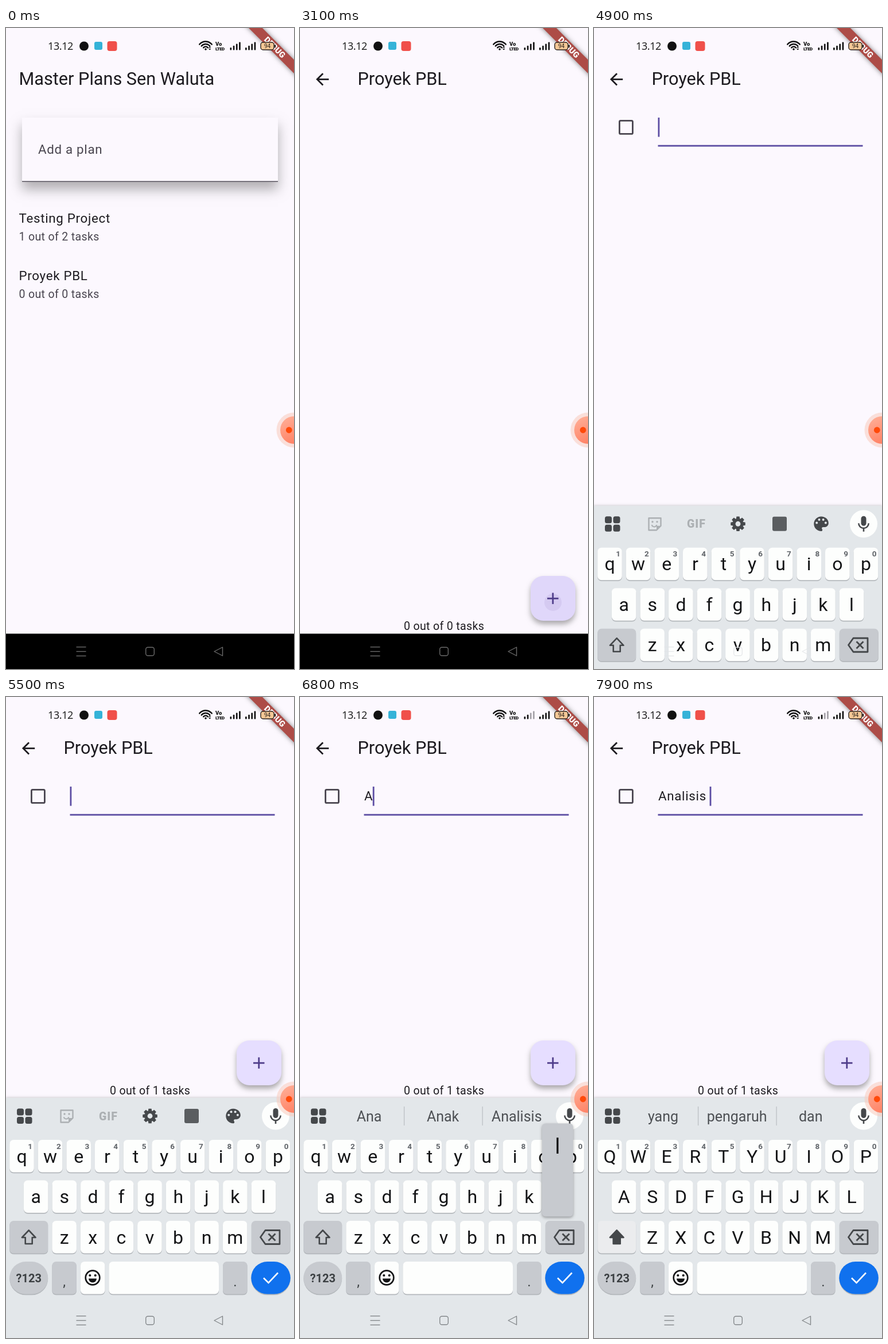
Recreate the animation shown at these times as an HTML page with a canvas. Size 502 px wide and 1116 px high, loop 8 s.

```html
<!DOCTYPE html>
<html lang="id">
<head>
<meta charset="utf-8">
<title>Master Plans</title>
<style>
html, body { margin: 0; width: 100%; height: 100%; overflow: hidden; background: #fcf8fe; }
canvas { display: block; width: 502px; height: 1116px; }
</style>
</head>
<body>
<canvas id="stage"></canvas>
<script>
const W = 502, H = 1116, LOOP = 8000, STEP = 100, DP = W / 360;
const BG = '#fcf8fe', INK = '#1d1b20', SOFT = '#49454f', PURPLE = '#5c4da3';
const KEYS = '#e3e7ea', GREY = '#c7cacf', DARK = '#45484b';
const ROBOTO = 'Roboto, sans-serif';
const canvas = document.getElementById('stage');
const c = canvas.getContext('2d');
const ratio = window.devicePixelRatio || 1;
canvas.width = W * ratio;
canvas.height = H * ratio;

// ---------- helpers ----------
function text(s, x, y, size, color, o = {}) {
  c.font = `${o.weight || 400} ${size}px ${o.font || ROBOTO}`;
  c.letterSpacing = (o.gap || 0) + 'px';
  c.textAlign = o.align || 'left';
  c.fillStyle = color;
  c.fillText(s, x, y);
  return c.measureText(s).width;
}
function rect(x, y, w, h, color) {
  c.fillStyle = color;
  c.fillRect(x, y, w, h);
}
function box(x, y, w, h, r, fill, stroke, line) {
  c.beginPath();
  c.roundRect(x, y, w, h, r);
  paint(fill, stroke, line);
}
function disc(x, y, r, fill, stroke, line) {
  c.beginPath();
  c.arc(x, y, r, 0, Math.PI * 2);
  paint(fill, stroke, line);
}
function poly(points, fill, stroke, line, open) {
  c.beginPath();
  points.forEach(([x, y]) => c.lineTo(x, y));
  if (!open) c.closePath();
  paint(fill, stroke, line);
}
function paint(fill, stroke, line = 1) {
  if (fill) { c.fillStyle = fill; c.fill(); }
  if (stroke) { c.strokeStyle = stroke; c.lineWidth = line; c.stroke(); }
}
function shadow(color, blur, dy) {
  c.shadowColor = color;
  c.shadowBlur = blur * ratio;
  c.shadowOffsetY = dy * ratio;
}
function at(x, y, scale, draw) {
  c.save();
  c.translate(x, y);
  c.scale(scale, scale);
  draw();
  c.restore();
}

// ---------- app pages ----------
function listPage() {
  text('Master Plans Sen Waluta', 22.5, 99, 22 * DP, INK);
  c.save();
  shadow('rgba(0,0,0,.30)', 20, 13);
  rect(28, 156, 446, 112, BG);
  c.restore();
  rect(28, 156, 446, 112, BG);
  rect(28, 266.5, 446, 1.4, SOFT);
  text('Add a plan', 56, 219, 16 * DP, SOFT, { gap: .7 });
  [['Testing Project', '1 out of 2 tasks'], ['Proyek PBL', '0 out of 0 tasks']].forEach(([name, sub], i) => {
    text(name, 22.5, 339 + i * 100.4, 16 * DP, INK, { gap: .7 });
    text(sub, 22.5, 370 + i * 100.4, 14 * DP, SOFT, { gap: .35 });
  });
}

function addButton(t, y) {
  c.save();
  shadow('rgba(0,0,0,.32)', 10, 6);
  box(402, y, 78, 78, 22, '#e6deff');
  c.restore();
  if (t >= 3100 && t < 4000) {
    c.save();
    c.beginPath();
    c.roundRect(402, y, 78, 78, 22);
    c.clip();
    const fade = Math.min(1, (4000 - t) / 400);
    rect(402, y, 78, 78, `rgba(79,55,139,${.04 * fade})`);
    disc(441, y + 46, 15 + (t - 3100) / 8, `rgba(79,55,139,${.08 * fade})`);
    c.restore();
  }
  rect(431, y + 37.8, 19.5, 2.8, '#4f3d8a');
  rect(439.4, y + 29.4, 2.8, 19.5, '#4f3d8a');
}

function taskRow(t) {
  box(44.4, 161.4, 23, 23, 2, null, SOFT, 2.8);
  if (t < 4500) {
    rect(111.5, 204.6, 357, 1.4, SOFT);
    return;
  }
  rect(111.5, 203.7, 357, 2.8, PURPLE);
  const typed = t < 6400 ? '' : t < 6900 ? 'A' : t < 7800 ? 'Anal' : 'Analisis ';
  const w = text(typed, 112, 180, 16 * DP, INK, { gap: .7 });
  const since = t < 6400 ? 4500 : t < 6900 ? 6400 : t < 7800 ? 6900 : 7800;
  if (Math.floor((t - since) / 500) % 2 === 0) rect(111.5 + w, 156, 2.8, 33.5, PURPLE);
}

function planPage(t) {
  const lift = t >= 5000 ? 356 : 0;
  at(22.3, 72.6, DP, () => {
    c.fillStyle = INK;
    c.fill(new Path2D('M20 11H7.83l5.59-5.59L12 4l-8 8 8 8 1.41-1.41L7.83 13H20z'));
  });
  text('Proyek PBL', 100.5, 99, 22 * DP, INK);
  if (t >= 3300) taskRow(t);
  text(`0 out of ${t < 3300 ? 0 : 1} tasks`, 251, 1048 - lift, 14 * DP, INK, { gap: .35, align: 'center' });
  addButton(t, 954 - lift);
}

function ribbon() {
  c.save();
  c.translate(W, 0);
  c.rotate(Math.PI / 4);
  c.save();
  shadow('rgba(0,0,0,.5)', 9, 0);
  rect(-80, 39, 160, 16.8, '#ad4c47');
  c.restore();
  text('DEBUG', 0, 52.4, 14.2, '#fff', { weight: 900, align: 'center' });
  c.restore();
}

// ---------- system bars ----------
function bars(x, weak) {
  for (let i = 0; i < 4; i++) {
    const h = 4.5 + i * 3.2;
    box(x + i * 5.2, 38.5 - h, 2.7, h, 1, weak && i > 1 ? '#a3a0a6' : '#111');
  }
}
function statusBar(t) {
  text('13.12', 73, 38, 18, '#222', { font: '"Noto Sans", sans-serif', gap: -.4 });
  disc(136, 31.5, 8, '#111');
  box(154, 24, 14, 14, 3, '#35b3d8');
  box(176.5, 23, 17, 17, 4, '#f0504a');
  c.lineCap = 'round';
  [5, 9.5, 14].forEach(r => {
    c.beginPath();
    c.arc(348, 37.5, r, -Math.PI * .78, -Math.PI * .22);
    paint(null, '#111', 2.4);
  });
  c.lineCap = 'butt';
  disc(348, 37, 1.8, '#111');
  poly([[353, 34.5], [355.2, 32], [357.4, 34.5]], '#111');
  poly([[353, 36], [355.2, 38.5], [357.4, 36]], '#111');
  text('Vo', 365, 31, 9.5, '#111', { weight: 900 });
  text('LTED', 365, 39, 8, '#111', { weight: 900, gap: -.7 });
  bars(390.5, t >= 6400);
  bars(417, false);
  box(444, 25, 23, 13, 4, '#f3c795', '#2a211c', 1.4);
  rect(468, 29, 2, 5, '#2a211c');
  text('94', 455.5, 35.2, 10, '#2a211c', { align: 'center' });
}

function navIcons(color) {
  [1077.7, 1085.5, 1093.3].forEach(y => rect(122.5, y - .7, 17, 1.4, color));
  box(243.7, 1078.2, 14.6, 14.6, 3.5, null, color, 1.4);
  c.lineJoin = 'round';
  poly([[363, 1085.5], [377.5, 1078], [377.5, 1093]], null, color, 1.4);
  c.lineJoin = 'miter';
}

function recorder() {
  disc(502, 700, 30.5, 'rgba(250,205,190,.55)');
  const g = c.createLinearGradient(485, 678, 505, 724);
  g.addColorStop(0, '#ffad95');
  g.addColorStop(1, '#ff8164');
  disc(502, 700, 24, g);
  disc(493.3, 700, 5.4, '#ff4a0a');
}

// ---------- keyboard ----------
const ROWS = [
  { keys: 'qwertyuiop', x: 27.5, y: 771 },
  { keys: 'asdfghjkl', x: 52.2, y: 841.5 },
  { keys: 'zxcvbnm', x: 101.6, y: 912 }
];
const PITCH = 49.6;

function key(x, y, w, color = '#fdfefd', r = 7) {
  box(x, y + 1.3, w, 57, r, '#b4b8bc');
  box(x, y, w, 56.6, r, color);
}
function gear(x, y) {
  const pts = [];
  for (let i = 0; i < 8; i++)
    [[-.34, 9.5], [-.2, 13], [.2, 13], [.34, 9.5]].forEach(([d, r]) => {
      const a = i * Math.PI / 4 + d;
      pts.push([x + r * Math.sin(a), y - r * Math.cos(a)]);
    });
  poly(pts, DARK);
  disc(x, y, 4.4, KEYS);
}
function palette() {
  c.fillStyle = DARK;
  c.fill(new Path2D('M12 3c-4.97 0-9 4.03-9 9s4.03 9 9 9c.83 0 1.5-.67 1.5-1.5 0-.39-.15-.74-.39-1.01-.23-.26-.38-.61-.38-.99 0-.83.67-1.5 1.5-1.5H16c2.76 0 5-2.24 5-5 0-4.42-4.03-8-9-8z'));
  [[6.5, 10.7], [9.5, 6.8], [14.5, 6.8], [17.5, 10.7]].forEach(([x, y]) => disc(x, y, 1.4, KEYS));
}
function tools() {
  const pale = '#acb0b3';
  c.lineJoin = 'round';
  poly([[95.5, 719.5], [116.5, 719.5], [116.5, 733], [109, 740.5], [95.5, 740.5]], null, pale, 2.4);
  c.lineJoin = 'miter';
  poly([[109, 741], [109, 733], [117, 733]], pale);
  disc(102, 726, 1.7, pale);
  disc(110, 726, 1.7, pale);
  c.beginPath();
  c.arc(105, 730, 4.6, .3, Math.PI - .3);
  paint(null, pale, 2);
  text('GIF', 178.5, 736.5, 19.5, pale, { weight: 900, align: 'center', gap: 1 });
  gear(251, 729.5);
  box(311, 717, 25, 25, 3, '#5a5d60');
  at(379, 712.5, 1.42, palette);
}
function suggestions(t) {
  const words = t < 7000 ? ['Ana', 'Anak', 'Analisis']
    : t < 7800 ? ['Analisa', 'Analisis', 'Analog'] : ['yang', 'pengaruh', 'dan'];
  if (t >= 7500 && t < 7700) box(184, 704, 132, 51, 6, '#d2d6da');
  words.forEach((s, i) => text(s, 120.5 + i * 128.6, 739, 25, '#4d5054', { align: 'center' }));
  rect(181, 713, 1.2, 33, '#b9bdc1');
  rect(317.5, 713, 1.2, 33, '#b9bdc1');
}
function mic() {
  disc(470, 729.5, 24, '#fdfefd');
  box(465.5, 716, 9, 17, 4.5, DARK);
  c.beginPath();
  c.arc(470, 728.5, 8.7, 0, Math.PI);
  paint(null, DARK, 2.5);
  rect(468.7, 736, 2.6, 7, DARK);
}
function popup(letter, upper) {
  const row = ROWS.find(r => r.keys.includes(letter));
  const x = row.x + row.keys.indexOf(letter) * PITCH;
  c.save();
  shadow('rgba(0,0,0,.35)', 5, 2);
  box(x - 27, row.y - 99, 54, 162, 6, GREY);
  c.restore();
  text(upper ? letter.toUpperCase() : letter, x, row.y - 47, 36, '#111', { align: 'center' });
}

function keyboard(t) {
  const drop = 418 * Math.pow(Math.max(0, (5100 - t) / 300), 2.81);
  const upper = (t >= 5900 && t < 6400) || t >= 7800;
  c.save();
  c.translate(0, drop);
  c.save();
  shadow('rgba(0,0,0,.18)', 4, -1);
  rect(0, 698, W, 420, KEYS);
  c.restore();

  [19, 33.5].forEach(x => [716.5, 731].forEach(y => box(x, y, 12, 12, 3.5, DARK)));
  if (t >= 6500) suggestions(t); else tools();
  mic();

  ROWS.forEach((row, n) => [...row.keys].forEach((k, i) => {
    const x = row.x + i * PITCH;
    key(x - 21.3, row.y, 42.6);
    text(upper ? k.toUpperCase() : k, x, row.y + 39.5, 32, '#141517', { align: 'center' });
    if (n === 0) text(String((i + 1) % 10), x + 14.7, row.y + 15.5, 13.5, '#5f6368', { weight: 700, align: 'center' });
  }));

  key(6.2, 912, 67, t === 5800 ? '#b2b6bb' : upper ? '#ebecee' : GREY);
  c.lineJoin = 'round';
  poly([[39.7, 928.5], [51.5, 941], [45.7, 941], [45.7, 952], [33.7, 952], [33.7, 941], [27.9, 941]],
    upper ? DARK : null, DARK, 2.6);
  key(427.8, 912, 68, GREY);
  poly([[443.5, 940.5], [452, 928.5], [477, 928.5], [477, 952.5], [452, 952.5]], null, DARK, 2.8);
  c.lineJoin = 'miter';
  poly([[457.5, 934.5], [469.5, 946.5]], null, DARK, 2.8, true);
  poly([[469.5, 934.5], [457.5, 946.5]], null, DARK, 2.8, true);

  key(6.2, 983, 67, GREY, 28.5);
  text('?123', 39.7, 1019, 20, '#3c4043', { weight: 700, align: 'center' });
  key(80.3, 983, 42.6, GREY);
  text(',', 101.6, 1026, 24, '#3c4043', { align: 'center' });
  key(129.9, 983, 42.6);
  disc(151, 1011, 12.3, null, '#141517', 2.7);
  disc(146.3, 1007, 2.1, '#141517');
  disc(155.7, 1007, 2.1, '#141517');
  c.beginPath();
  c.arc(151, 1012.5, 7, 0, Math.PI);
  paint('#141517');
  key(179.3, 983, 191.7);
  key(378, 983, 42.6, GREY);
  text('.', 399.3, 1026, 24, '#3c4043', { align: 'center' });
  key(427.3, 983, 68.5, '#1071ee', 28.5);
  poly([[449, 1011.5], [457.5, 1020], [474, 1002.5]], null, '#fff', 2.6, true);

  const pressed = { 6300: 'a', 6400: 'n', 6500: 'a', 6800: 'l' }[t];
  if (pressed) popup(pressed, upper);
  c.restore();
  navIcons(t < 5300 ? 'rgba(225,228,230,.8)' : '#84888b');
}

// ---------- timeline ----------
function draw(t) {
  c.setTransform(ratio, 0, 0, ratio, 0, 0);
  rect(0, 0, W, H, BG);
  if (t < 1300) {
    listPage();
  } else {
    const zoom = t < 1400 ? .98 : 1;
    c.save();
    c.translate(251, 527);
    c.scale(zoom, zoom);
    c.translate(-251, -527);
    planPage(t);
    c.restore();
  }
  ribbon();
  statusBar(t);
  if (t < 4900) {
    rect(0, 1054.5, W, 62, '#000');
    navIcons('#6a6a6a');
  } else {
    keyboard(t);
  }
  recorder();
}

const start = performance.now();
function tick() {
  const t = (performance.now() - start) % LOOP;
  draw(Math.floor(t / STEP) * STEP);
  requestAnimationFrame(tick);
}
tick();
</script>
</body>
</html>
```
